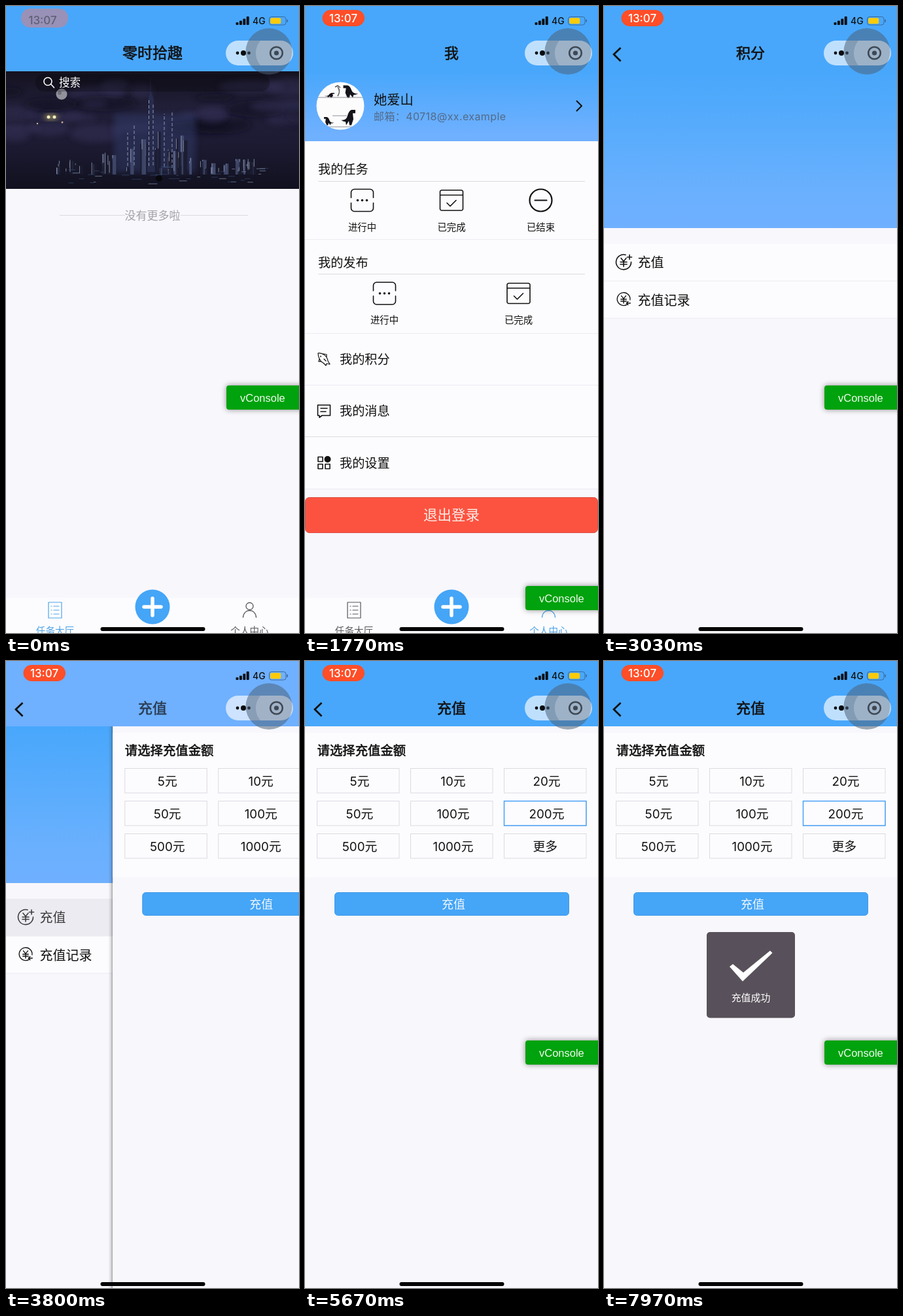
Animation, 448 px wide and 960 px high, one loop 8 s. Source, as an HTML page:

```html
<!DOCTYPE html>
<html lang="zh-CN">
<head>
<meta charset="utf-8">
<title>充值</title>
<style>
html, body { margin: 0; width: 100%; height: 100%; overflow: hidden; background: #f8f7fb; }
svg { display: block; width: 100vw; height: 100vh; }
text { font-family: Inter, "Noto Sans CJK SC", "Noto Sans CJK", sans-serif; fill: #111; }
.ln { fill: none; stroke: #111; stroke-width: 1.6; stroke-linecap: round; stroke-linejoin: round; }
.med { stroke: #111; stroke-width: .6; }
.blue .ln { stroke: #4fa3e6; }
.blue text { fill: #4fa3e6; }
.idle .ln { stroke: #55555a; }
.idle text { fill: #5c5c60; }
</style>
</head>
<body>
<svg id="stage" viewBox="0 0 448 960"></svg>
<script>
const LOOP = 8000, W = 448;
const TAB_AT = 560, POINTS_AT = 2436, PAY_AT = 3681, PICK_AT = 5600, TOAST_AT = 7500;
const BLUE = '#48a7fb', PALE = '#6fb0ff', WHITE = '#fcfcff', GREY = '#f8f7fb', RULE = '#dcdae0', FAINT = '#ecebf0';

const rect = (x, y, w, h, fill, more = '') =>
  `<rect x="${x}" y="${y}" width="${w}" height="${h}" fill="${fill}" ${more}/>`;
const circle = (x, y, r, fill, more = '') =>
  `<circle cx="${x}" cy="${y}" r="${r}" fill="${fill}" ${more}/>`;
const text = (x, y, size, s, more = '') =>
  `<text x="${x}" y="${y}" font-size="${size}" ${more}>${s}</text>`;
const mid = (x, y, size, s, more = '') => text(x, y, size, s, `text-anchor="middle" ${more}`);
const line = (d, more = '') => `<path class="ln" d="${d}" ${more}/>`;
const rule = (x1, x2, y, color = RULE) => `<path d="M${x1} ${y}H${x2}" stroke="${color}"/>`;
const at = (x, y, s, more = '') => `<g transform="translate(${x} ${y})" ${more}>${s}</g>`;
const group = (id, s) => `<g id="${id}">${s}</g>`;

function random(seed) {
  return () => (seed = (seed * 16807) % 2147483647) / 2147483647;
}

const vConsole = y => rect(337, y, 120, 37, '#04a20a', 'rx="4" filter="url(#glow)"') +
  text(358, y + 25.3, 16.5, 'vConsole', 'style="font-family:Liberation Sans,sans-serif;fill:#f0faf0"');

const icons = {
  doing: line('M-17 -4V-12a5 5 0 0 1 5 -5H12a5 5 0 0 1 5 5V-4M17 4V12a5 5 0 0 1 -5 5H-12a5 5 0 0 1 -5 -5V4') +
    [-7, 0, 7].map(x => circle(x, 0, 1.8, '#111')).join(''),
  done: line('M-15 -15.5H15a2.5 2.5 0 0 1 2.5 2.5V13a2.5 2.5 0 0 1 -2.5 2.5H-15a2.5 2.5 0 0 1 -2.5 -2.5V-13a2.5 2.5 0 0 1 2.5 -2.5ZM-17 -8H17M-7 4L-2 9L7 0'),
  ended: line('M-17 0a17 17 0 1 0 34 0a17 17 0 1 0 -34 0M-9 0H9', 'style="stroke-width:2.2"'),
  fish: line('M-9 -9C-3 -10 5 -5 6 3L9 8L4 7L3 10L-1 6C-6 4 -9 -3 -9 -9ZM-2 -8L4 -7L4 -3M-7 0L-8 4L-4 4M0 0L3 3', 'style="stroke-width:1.2"') +
    circle(-5, -4, 1, '#111'),
  message: line('M-9.5 -9H9.5V7H-3L-7 10V7H-9.5ZM-5 -4H5M-5 1H3'),
  setup: line('M-9 -9h7v7h-7ZM-9 2h7v7h-7ZM2 2h7v7h-7Z') + circle(5.5, -5.5, 5, '#111'),
  yen: line('M-4 -6L0 -1L4 -6M0 -1V7M-5 0H5M-5 3.5H5'),
  list: line('M-10 -12H10V12H-10ZM-6 -6h1M-6 0h1M-6 6h1M-2 -6H6M-2 0H6M-2 6H6', 'style="stroke-width:1.2"'),
  person: line('M-5.5 -6a5.5 5.5 0 1 0 11 0a5.5 5.5 0 1 0 -11 0M-10 11C-9 -3 9 -3 10 11', 'style="stroke-width:1.3"')
};

function tabBar(active) {
  const tab = (x, icon, label, on) =>
    at(x, 925, icons[icon] + mid(0, 36.5, 14.6, label), `class="${on ? 'blue' : 'idle'}"`);
  return rect(0, 906, W, 54, WHITE) +
    tab(75, 'list', '任务大厅', active === 0) + tab(372.5, 'person', '个人中心', active === 1) +
    circle(224, 920, 26.5, '#45a5f7') +
    '<path d="M211 920H237M224 907V933" stroke="#fff" stroke-width="5.5" stroke-linecap="round"/>';
}

function banner() {
  const rnd = random(77);
  let s = rect(0, 100, W, 180, 'url(#night)');
  for (let i = 0; i < 30; i++) {
    const x = rnd() * W, y = 122 + rnd() * 75;
    s += `<ellipse cx="${x}" cy="${y}" rx="${18 + rnd() * 40}" ry="${4 + rnd() * 10}" fill="${i % 3 ? '#363358' : '#100f1e'}" opacity=".5" filter="url(#soft)"/>`;
  }
  s += rect(165, 165, 125, 90, '#34406f', 'opacity=".45" filter="url(#soft)"');
  for (let i = 0; i < 60; i++) {
    const x = 75 + rnd() * 315, near = Math.max(0, 1 - Math.abs(x - 228) / 90);
    const h = 8 + rnd() * (18 + 62 * near), w = 2 + rnd() * 5;
    s += rect(x, 258 - h, w, h, i % 3 ? '#1a1b2e' : '#454f72', 'opacity=".8"');
    s += rect(x, 258 - h, 1, h * rnd(), '#a6aec8', 'opacity=".7"');
  }
  s += '<path d="M216 254L218 140L220 132L221 105L222 132L226 142L228 254Z" fill="#272b4c"/>' +
    '<path d="M218.5 245V142M225 244V150M186 245V194M196 244V182M242 246V165M254 248V160" stroke="#8c94b4" stroke-dasharray="5 3"/>';
  for (let i = 0; i < 40; i++)
    s += rect(90 + rnd() * 300, 245 + rnd() * 27, 3 + rnd() * 14, 1, i % 3 ? '#3a5078' : '#9aa8c0', 'opacity=".6"');
  s += circle(85, 135, 8.5, '#92929c') + circle(82, 133, 3, '#70707c') +
    '<ellipse cx="69" cy="170" rx="11" ry="3.5" fill="#a89c5c" filter="url(#soft)"/>' +
    circle(65, 170, 2.5, '#f6efc0') + circle(74, 170, 2.5, '#f6efc0') +
    circle(48, 180, 1.2, '#c9bc90') + circle(86, 178, 1.5, '#c4a78f') +
    rect(45, 104, 358, 27, '#000', 'rx="13.5" opacity=".25"') +
    line('M58 115.5a6 6 0 1 0 12 0a6 6 0 1 0 -12 0M69 120L73.5 125', 'style="stroke:#fff"') +
    text(81, 123.3, 16.6, '搜索', 'style="fill:#fff"') + circle(234, 264, 5, '#08080c');
  return s;
}

function homePage() {
  return rect(0, 100, W, 860, GREY) + banner() + rule(82, 182, 320.5) + rule(267, 370, 320.5) +
    mid(224, 326.5, 17, '没有更多啦', 'style="fill:#a3a2a8"') + tabBar(0) + vConsole(581);
}

function avatar() {
  const beast = 'M-12 2Q-4 3 -2 -3Q0 -9 4 -10H10V-6H6L7 1L4 8H1L0 3L-4 8L-5 4Q-9 4 -12 2Z';
  const shape = (x, y, sx, sy) => `<path d="${beast}" transform="translate(${x} ${y}) scale(${sx} ${sy})" fill="#15141a"/>`;
  return circle(54, 153, 36.5, '#fcfcfd') + '<g clip-path="url(#round)">' +
    shape(69, 132, -1.05, 1.05) + shape(38, 137, .7, .4) + shape(67, 172, 1, 1.3) + shape(36, 177, -.7, .7) +
    '<path d="M50 138Q55 130 50 124M46 124L50 122L54 125" fill="none" stroke="#555" stroke-width="1.5"/>' +
    '<path d="M18 140H90M42 168H64M18 185H90" stroke="#8f8f98"/></g>';
}

function mePage() {
  const item = (x, y, icon, label) => at(x, y, icons[icon] + mid(0, 46, 14.4, label));
  const row = (y, icon, label) => at(29, y, icons[icon] + text(24, 7, 19.2, label));
  return rect(0, 100, W, 860, GREY) + rect(0, 100, W, 107, 'url(#head)') + avatar() +
    text(105, 151, 20.3, '她爱山') +
    text(105, 175, 16, '邮箱：40718@xx.example', 'style="fill:#526a88" letter-spacing=".4"') +
    line('M415.5 145.5L423 153L415.5 160.5', 'style="stroke-width:2"') +
    rect(0, 207, W, 532, WHITE) + rule(0, W, 357.5, FAINT) + rule(0, W, 501.5, FAINT) +
    text(20, 257, 19.2, '我的任务') + rule(20, 428, 268.5) +
    item(87.5, 297.5, 'doing', '进行中') + item(224, 297.5, 'done', '已完成') + item(360.5, 297.5, 'ended', '已结束') +
    text(20, 399.5, 19.2, '我的发布') + rule(20, 428, 410.5) +
    item(121.5, 440, 'doing', '进行中') + item(326.5, 440, 'done', '已完成') +
    group('scoreRow', row(540.5, 'fish', '我的积分')) + rule(0, W, 580.5, FAINT) +
    row(620, 'message', '我的消息') + rule(0, W, 659.5) + row(699.5, 'setup', '我的设置') +
    rule(0, W, 739.5, FAINT) +
    rect(.5, 752.5, 447, 54, '#fc5340', 'rx="6" stroke="#dc5148"') +
    mid(224, 787, 21.5, '退出登录', 'style="fill:#fdeeea"') + tabBar(1) + vConsole(888);
}

const edge = rect(-7, 100, 7, 860, 'url(#edge)');

function pointsPage() {
  const coin = (y, s, arc) => at(30, y, `<g transform="scale(${s})">${icons.yen}${line(arc)}</g>`);
  return edge + rect(0, 100, W, 860, GREY) + rect(0, 100, W, 240, 'url(#tall)') +
    rect(0, 364, W, 114, WHITE) + `<rect id="hover" y="364" width="${W}" height="57" fill="#ecebf1"/>` +
    group('payRow', coin(392, 1, 'M3 -11A11.5 11.5 0 1 0 11.5 0M9 -11V-4M5.5 -7.5H12.5') + text(51.5, 400, 20, '充值')) +
    rule(0, W, 421, FAINT) +
    coin(449, .86, 'M6 9.5A11.5 11.5 0 1 1 11.5 1M5 7H12M5 7L8 4M5 7L8 10') +
    text(51.5, 458, 20, '充值记录') + rule(0, W, 478, FAINT) + vConsole(581);
}

function payPage() {
  const sums = ['5元', '10元', '20元', '50元', '100元', '200元', '500元', '1000元', '更多'];
  const cells = sums.map((s, i) => {
    const x = 18.5 + (i % 3) * 143, y = 164.5 + Math.floor(i / 3) * 50;
    return rect(x, y, 125.5, 37.5, WHITE, `stroke="${RULE}"`) + mid(x + (i < 8 ? 65 : 62.7), y + 26, 18.8, s);
  }).join('');
  return edge + rect(0, 100, W, 860, GREY) + rect(0, 110, W, 221, WHITE) +
    text(18.5, 144, 19.4, '请选择充值金额', 'class="med"') + cells +
    rect(304.5, 214.5, 125.5, 37.5, 'none', 'id="picked" stroke="#48a0f5" stroke-width="1.5"') +
    rect(45.5, 354.5, 358, 35, '#45a5f7', 'rx="5" stroke="#419be8"') +
    mid(227, 378.5, 18, '充值', 'style="fill:#eef7ff"') + vConsole(581) +
    group('toast', rect(157, 415, 135, 131.5, '#58505a', 'rx="5"') +
      '<path d="M192 468L197 464L213 477L254 443.5L257.5 447L212 490.5Z" fill="#fff"/>' +
      mid(224.5, 521, 14.9, '充值成功', 'style="fill:#fff"'));
}

function statusBar() {
  const bars = [4, 6.5, 9.5, 13].map((h, i) =>
    rect(351.5 + i * 5.4, 29 - h, 4, h, '#0b1014', `rx="1" id="bar${i}"`)).join('');
  return '<rect id="pill"/>' + mid(0, 0, 17, '13:07', 'id="clock" font-weight="500"') + bars +
    text(377, 28, 14, '4G', 'font-weight="500"') +
    rect(402.5, 16.5, 25.5, 12.5, 'none', 'rx="3.5" stroke="#3a6a9c"') +
    rect(404.2, 18.2, 16, 9, '#fccb08', 'rx="2"') + rect(429.3, 20.5, 1.6, 4.5, '#3a6a9c', 'rx=".8"');
}

const capsule = rect(336, 53, 103, 38, '#fff', 'rx="19" opacity=".65"') +
  circle(354, 72, 2.4, '#080c10') + circle(363, 72, 4, '#080c10') + circle(371.5, 72, 2.4, '#080c10') +
  circle(402, 69.5, 35.5, '#4c6076', 'opacity=".53"') +
  '<path d="M389 53H420A19 19 0 0 1 420 91H389A29 29 0 0 1 389 53Z" fill="#c6d2e0" opacity=".4"/>' +
  circle(413.5, 72, 9.3, 'none', 'stroke="#3e4854" stroke-width="2.6"') + circle(413.5, 72, 3.6, '#3e4854');

const grad = (id, stops, dir = 'x2="0" y2="1"') => `<linearGradient id="${id}" ${dir}>` +
  stops.map(([o, c, a = 1]) => `<stop offset="${o}" stop-color="${c}" stop-opacity="${a}"/>`).join('') + '</linearGradient>';
const title = (id, s, size) => mid(224, 80, size, s, `id="${id}" class="med"`);

document.getElementById('stage').innerHTML = '<defs>' +
  grad('head', [[0, BLUE], [.9, PALE], [1, PALE]]) + grad('tall', [[0, BLUE], [.75, '#69b0fe'], [1, PALE]]) +
  grad('night', [[0, '#14121f'], [.3, '#211f38'], [.6, '#1d1b33'], [1, '#11111f']]) +
  grad('edge', [[0, '#333', 0], [.5, '#333', .12], [1, '#333', .42]], '') +
  '<filter id="glow" x="-20%" y="-50%" width="140%" height="200%"><feDropShadow dx="0" dy="0" stdDeviation="4" flood-color="#000" flood-opacity=".45"/></filter>' +
  '<filter id="soft" x="-50%" y="-50%" width="200%" height="200%"><feGaussianBlur stdDeviation="4"/></filter>' +
  '<clipPath id="round"><circle cx="54" cy="153" r="36.5"/></clipPath></defs>' +
  group('home', homePage()) + group('me', mePage()) + group('points', pointsPage()) + group('pay', payPage()) +
  `<rect id="nav" width="${W}" height="100"/>` +
  title('homeTitle', '零时拾趣', 23) + title('meTitle', '我', 22) +
  title('pointsTitle', '积分', 22) + title('payTitle', '充值', 22) +
  line('M25.5 64L15 74L25.5 84.5', 'id="back" style="stroke-width:2.8;stroke-linecap:butt;stroke-linejoin:miter"') +
  statusBar() + capsule + rect(144.5, 951, 160, 6, '#050505', 'rx="3"');

const el = {};
document.querySelectorAll('#stage [id]').forEach(n => el[n.id] = n);
const set = (id, attrs) => { for (const k in attrs) el[id].setAttribute(k, attrs[k]); };
const show = (id, on) => set(id, { visibility: on ? 'visible' : 'hidden' });
const fade = (id, a) => set(id, { opacity: a });
const clamp = v => Math.max(0, Math.min(1, v));
const mix = (a, b, p) => a + (b - a) * p;
const mixRgb = (a, b, p) => `rgb(${a.map((v, i) => Math.round(mix(v, b[i], p)))})`;

// Critically damped push from the right edge.
function pushX(t) {
  if (t < 0) return W;
  if (t > 480) return 0;
  const u = t * .018;
  return W * (1 + u) * Math.exp(-u);
}
const fadeIn = t => t < 0 ? 0 : t > 480 ? 1 : 1 - Math.exp(-t / 95);
const fadeOut = t => t < 0 ? 1 : clamp(1 - (t / 100) ** 2);

function draw(t) {
  const a = t - POINTS_AT, b = t - PAY_AT;
  const moving = s => s >= 0 && s < 420;
  const onHome = t < TAB_AT;
  show('home', onHome);
  show('me', !onHome && a < 480);
  show('points', a >= 0 && b < 480);
  show('pay', b >= 0);
  set('points', { transform: `translate(${pushX(a)} 0)` });
  set('pay', { transform: `translate(${pushX(b)} 0)` });

  set('nav', { fill: moving(a) || moving(b) ? PALE : BLUE });
  fade('homeTitle', onHome ? 1 : 0);
  fade('meTitle', onHome ? 0 : fadeOut(a));
  fade('pointsTitle', fadeIn(a) * fadeOut(b));
  fade('payTitle', fadeIn(b));
  fade('back', fadeIn(a));

  fade('scoreRow', a > -90 ? .7 : 1);
  fade('hover', b > -90 ? 1 : 0);
  fade('payRow', b > -90 ? .8 : 1);
  show('picked', t >= PICK_AT);
  fade('toast', clamp((t - TOAST_AT) / 100));

  const p = 1 - (1 - clamp(t / 300)) ** 2;
  set('pill', {
    x: mix(23, 26.5, p), y: mix(4, 6, p), width: mix(72, 64.5, p), height: mix(29, 25, p),
    rx: mix(14, 12.5, p), fill: mixRgb([152, 145, 184], [255, 78, 40], p)
  });
  set('clock', { x: mix(56, 58.5, p), y: mix(28.5, 24.5, p) });
  el.clock.style.fill = mixRgb([92, 96, 116], [255, 255, 255], p);
  fade('bar3', t > 4250 && t < 5200 ? .3 : 1);
}

const start = performance.now();
function tick() {
  draw((performance.now() - start) % LOOP);
  requestAnimationFrame(tick);
}
tick();
</script>
</body>
</html>
```
